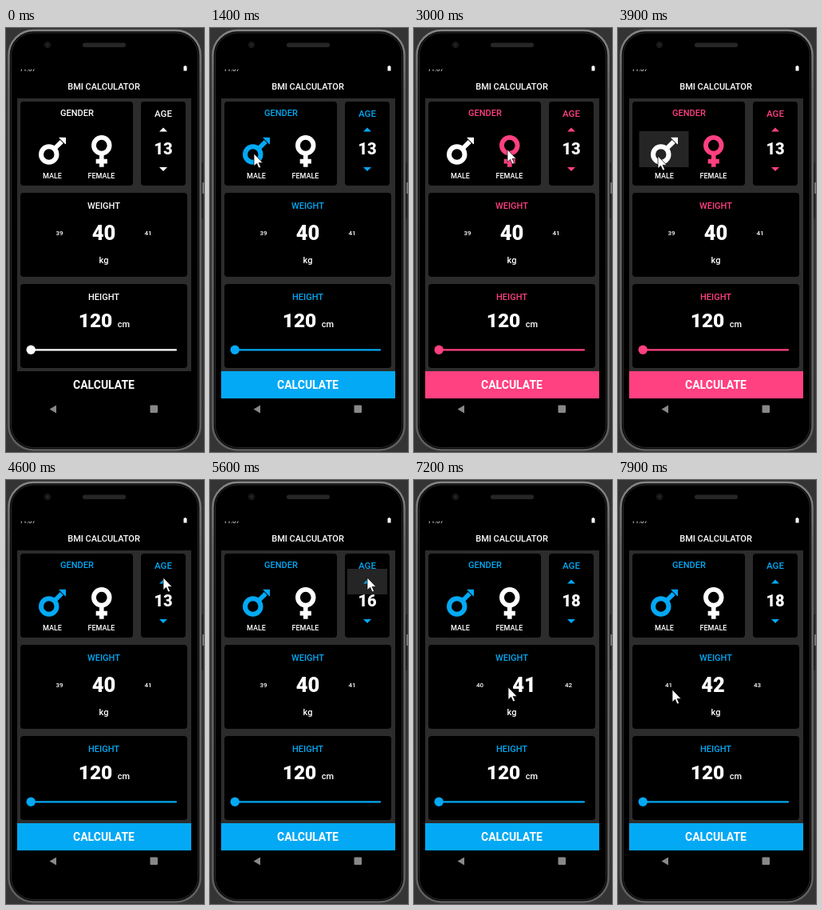
Write an HTML page that moves like this. It is 248 px wide and 530 px high and loops after 8 s.

```html
<!DOCTYPE html>
<html lang="en">
<head>
<meta charset="utf-8">
<title>BMI calculator</title>
<style>
  html, body { margin: 0; width: 100%; height: 100%; overflow: hidden; background: #343434; }
  svg { display: block; width: 248px; height: 530px; font-family: Roboto, Arial, sans-serif; fill: #fff; }
  text { text-anchor: middle; font-weight: 500; font-size: 11px; }
  .accent { fill: var(--accent); }
  .black { font-weight: 900; }
  .small { font-size: 9px; }
  .side { font-size: 8px; }
  .main { font-size: 25.5px; font-weight: 900; }
  .press { fill: #252525; visibility: hidden; }
</style>
</head>
<body>
<svg viewBox="0 0 248 530">
  <defs>
    <clipPath id="statusClip"><rect x="14" y="51.5" width="60" height="6"/></clipPath>
    <clipPath id="wheelClip"><rect x="39" y="236" width="166" height="40"/></clipPath>
    <linearGradient id="rim" x2="0" y2="1">
      <stop stop-color="#858585"/>
      <stop offset=".15" stop-color="#686868"/>
      <stop offset="1" stop-color="#606060"/>
    </linearGradient>
  </defs>

  <!-- phone -->
  <rect x="245" y="168" width="2" height="70" fill="#222"/>
  <rect x="246" y="193" width="2" height="14" fill="#777"/>
  <rect x="3.5" y="3" width="240" height="524.5" rx="31" fill="#080808" stroke="url(#rim)" stroke-width="2.5"/>
  <rect x="6.5" y="6" width="234" height="518.5" rx="28" fill="#000" stroke="#2b2b2b"/>
  <circle cx="52" cy="21" r="3.5" fill="#111416" stroke="#202020"/>
  <circle cx="52" cy="21" r="1.5" fill="#262c30"/>
  <rect x="96" y="18.5" width="54" height="5.5" rx="2.7" fill="#262626"/>
  <text x="27" y="54" style="font-size:8px" opacity=".8" clip-path="url(#statusClip)">11:07</text>
  <path d="M222.5 48h1v-1h2v1h1v5.5h-4z"/>
  <path d="M63 471.5v10l-8.5-5z" fill="#888"/>
  <rect x="180.5" y="471.5" width="9.5" height="9.5" rx="1" fill="#888"/>

  <!-- app -->
  <text x="122.5" y="76.5">BMI CALCULATOR</text>
  <rect x="14" y="88" width="218" height="341" fill="#2c2c2c"/>
  <g fill="#000">
    <rect x="18" y="92" width="141" height="105" rx="4"/>
    <rect x="169" y="92" width="56" height="105" rx="4"/>
    <rect x="18" y="206" width="209" height="105" rx="4"/>
    <rect x="18" y="320" width="209" height="105" rx="4"/>
  </g>

  <rect id="malePress" class="press" x="26.5" y="129" width="62" height="45"/>
  <rect id="femalePress" class="press" x="89" y="129" width="62" height="45"/>
  <rect id="agePress" class="press" x="172" y="111" width="50" height="32"/>

  <text x="89" y="110" class="accent">GENDER</text>
  <g id="male" transform="translate(41 131) scale(.0885)">
    <circle cx="144" cy="304" r="110" fill="none" stroke="currentColor" stroke-width="68"/>
    <path d="M222 226L325 123" stroke="currentColor" stroke-width="64"/>
    <path d="M293 70H378V155Z" fill="currentColor" stroke="currentColor" stroke-width="12" stroke-linejoin="round"/>
  </g>
  <g id="female" transform="translate(107 131.2) scale(.0885)">
    <circle cx="144" cy="176" r="111" fill="none" stroke="currentColor" stroke-width="66"/>
    <path d="M144 300V480M64 400H224" stroke="currentColor" stroke-width="64"/>
  </g>
  <text x="58" y="188" class="small">MALE</text>
  <text x="119.5" y="188" class="small">FEMALE</text>

  <text x="197" y="110.5" class="accent" style="font-size:11.5px">AGE</text>
  <path d="M192 129.5h10l-5-5z" class="accent"/>
  <text id="age" x="197" y="158" class="black" style="font-size:20px">13</text>
  <path d="M192 174h10l-5 5z" class="accent"/>

  <text x="122.5" y="226" class="accent">WEIGHT</text>
  <g id="wheel" clip-path="url(#wheelClip)"></g>
  <text x="122.5" y="294">kg</text>

  <text x="122.5" y="340" class="accent">HEIGHT</text>
  <text x="112" y="374" class="black" style="font-size:24.5px">120</text>
  <text x="147.5" y="374">cm</text>
  <rect x="31" y="401.2" width="183" height="2.2" rx="1" class="accent"/>
  <circle cx="31.2" cy="402.3" r="5.7" class="accent"/>

  <rect id="bar" x="14" y="429" width="218" height="34"/>
  <text x="122.5" y="451" style="font-size:14px;font-weight:700">CALCULATE</text>

  <path id="cursor" d="M0 0V15.6L3.6 12.3L6.1 18L8.6 16.9L6.1 11.4H11Z" stroke="#000" stroke-width=".7"/>
</svg>
<script>
const LOOP = 8000, STEP = 100;
const WHITE = '#fff', BLUE = '#03a9f4', PINK = '#ff4081';
const ITEM = 55.5, FIRST = 38;

// [time, x, y]
const cursorPath = [
  [300, 144, 328], [400, 118, 275], [500, 82, 215], [600, 45, 168], [700, 55, 157],
  [1600, 55, 157], [1700, 48, 153], [1900, 83, 145], [2100, 117, 152],
  [3300, 117, 152], [3600, 50, 160],
  [4100, 50, 160], [4600, 197, 122],
  [5800, 197, 122], [6400, 168, 214], [6700, 158, 256],
  [7100, 158, 256], [7200, 118, 259], [7300, 94, 261], [7500, 68, 262]
];
// [time, distance scrolled]
const scrollPath = [
  [7100, 0], [7200, 40], [7300, 64], [7500, 90], [7700, 90], [7800, 107], [7900, 114.5]
];
// [time, chosen gender]
const choices = [[0, ''], [1400, 'male'], [2600, 'female'], [4000, 'male']];

const el = id => document.getElementById(id);
const svg = document.querySelector('svg');
const between = (t, a, b) => t >= a && t < b;

function along(path, t) {
  const i = path.findIndex(p => p[0] > t);
  if (i < 0) return path[path.length - 1].slice(1);
  if (i === 0) return path[0].slice(1);
  const a = path[i - 1], b = path[i];
  const k = (t - a[0]) / (b[0] - a[0]);
  return a.slice(1).map((v, n) => v + (b[n + 1] - v) * k);
}

function show(id, on) {
  el(id).style.visibility = on ? 'visible' : 'hidden';
}

const weights = Array.from({ length: 8 }, (_, i) => {
  const text = document.createElementNS('http://www.w3.org/2000/svg', 'text');
  text.textContent = FIRST + i;
  return el('wheel').appendChild(text);
});

function drawWheel(offset) {
  const chosen = 40 + Math.round(offset / ITEM);
  weights.forEach((text, i) => {
    const value = FIRST + i, main = value === chosen;
    text.setAttribute('class', main ? 'main' : 'side');
    text.setAttribute('x', 122.5 + (value - 40) * ITEM - offset);
    text.setAttribute('y', main ? 265 : 259);
  });
}

function draw(t) {
  const gender = choices.filter(c => c[0] <= t).pop()[1];
  const accent = { male: BLUE, female: PINK }[gender] || WHITE;
  svg.style.setProperty('--accent', accent);
  el('bar').style.fill = gender ? accent : '#000';
  for (const id of ['male', 'female']) el(id).style.color = id === gender ? accent : WHITE;

  show('malePress', between(t, 3800, 4100));
  show('femalePress', between(t, 2400, 2700));
  show('agePress', between(t, 5000, 5900) && t % 200 === 0);
  el('age').textContent = 13 + Math.max(0, Math.min(5, Math.floor((t - 4900) / 200)));

  drawWheel(along(scrollPath, t)[0]);
  show('cursor', t >= 300);
  el('cursor').setAttribute('transform', `translate(${along(cursorPath, t)})`);
}

const start = performance.now();
function tick() {
  const t = (performance.now() - start) % LOOP;
  draw(Math.floor(t / STEP) * STEP);
  requestAnimationFrame(tick);
}
tick();
</script>
</body>
</html>
```
